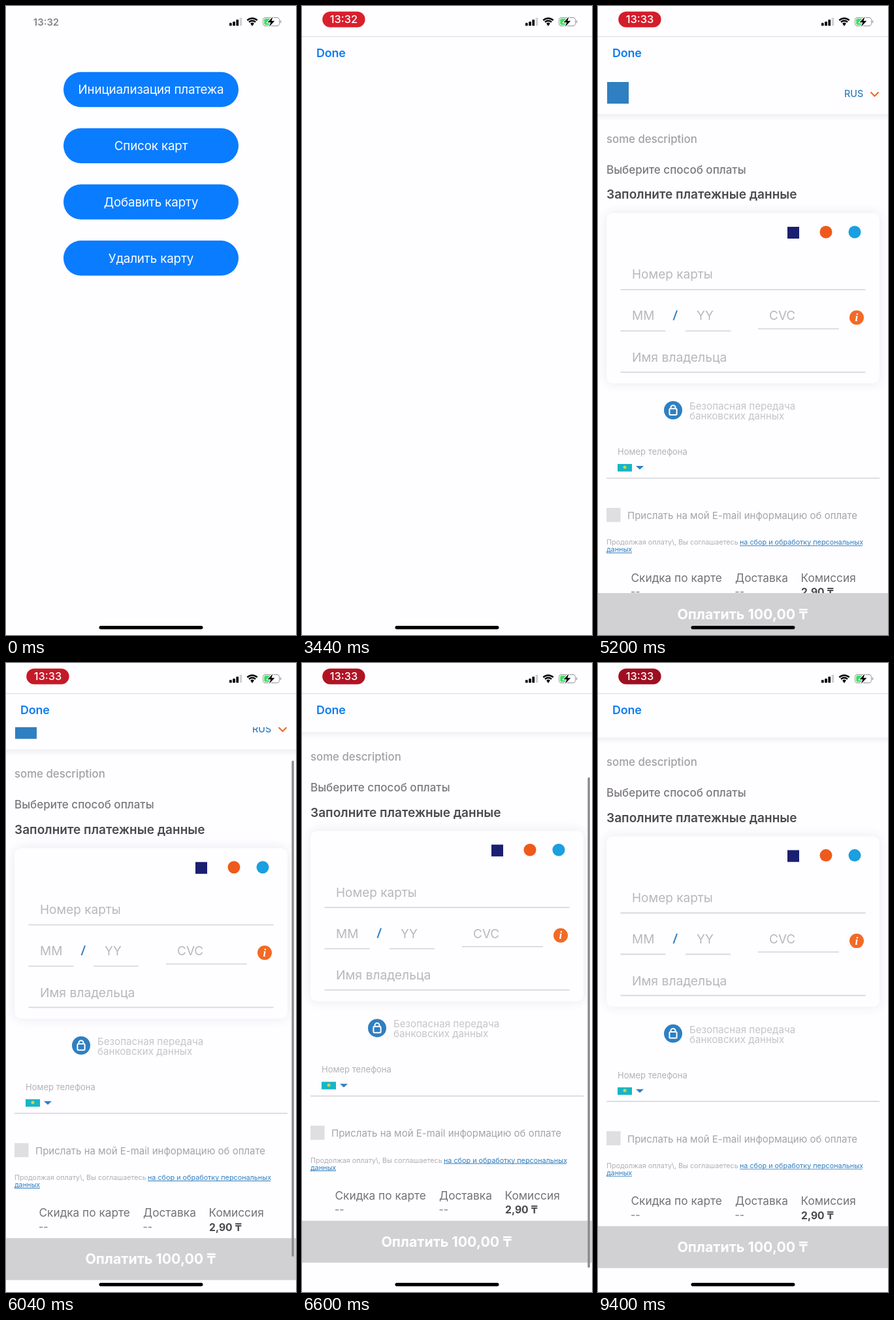
These frames come from a looping animation (444 px wide and 960 px high, 9.48 s). An HTML page with a canvas:

```html
<!DOCTYPE html>
<html lang="ru">
<head>
<meta charset="utf-8">
<title>Оплата</title>
<style>
  html, body { margin: 0; width: 100%; height: 100%; overflow: hidden; background: #fefdff; }
  canvas { display: block; width: 444px; height: 960px; }
</style>
</head>
<body>
<canvas id="stage"></canvas>
<script>
const W = 444, H = 960, LOOP = 9480;
const BG = '#fefdff', BLUE = '#0a7cff', LINK = '#2f7fc1', ORANGE = '#f26a26';
const BAR_BOTTOM = 98, REST_SCROLL = 51.4, PEAK_SCROLL = 91;
const canvas = document.getElementById('stage');
const ctx = canvas.getContext('2d');
const ratio = window.devicePixelRatio || 1;
canvas.width = W * ratio;
canvas.height = H * ratio;

const clamp = v => Math.max(0, Math.min(1, v));
const progress = (t, from, to) => clamp((t - from) / (to - from));
const easeOut = (p, power) => 1 - Math.pow(1 - p, power);

// y is the middle of the capital letters
function text(str, x, y, size, color, { weight = 400, align = 'left', spacing = 0 } = {}) {
  ctx.font = `${weight} ${size}px Inter, sans-serif`;
  ctx.letterSpacing = spacing + 'px';
  ctx.textAlign = align;
  ctx.fillStyle = color;
  ctx.fillText(str, x, y + size * 0.36);
}

function rect(x, y, w, h, color, radius = 0) {
  ctx.fillStyle = color;
  ctx.beginPath();
  ctx.roundRect(x, y, w, h, radius);
  ctx.fill();
}

function disc(x, y, r, color) {
  ctx.fillStyle = color;
  ctx.beginPath();
  ctx.arc(x, y, r, 0, 2 * Math.PI);
  ctx.fill();
}

function path(points, color, width, close) {
  ctx.beginPath();
  points.forEach(([x, y]) => ctx.lineTo(x, y));
  if (close) ctx.closePath();
  if (width) {
    ctx.strokeStyle = color;
    ctx.lineWidth = width;
    ctx.stroke();
  } else {
    ctx.fillStyle = color;
    ctx.fill();
  }
}

function faded(alpha, draw) {
  if (alpha <= 0) return;
  ctx.save();
  ctx.globalAlpha *= alpha;
  draw();
  ctx.restore();
}

function drawMenu(shift) {
  const labels = ['Инициализация платежа', 'Список карт', 'Добавить карту', 'Удалить карту'];
  labels.forEach((label, i) => {
    const y = 100.7 + i * 85.8;
    rect(88 + shift, y, 268, 53.5, BLUE, 26.7);
    text(label, 222 + shift, y + 27, 18.8, '#fff', { align: 'center', spacing: -0.15 });
  });
}

function drawSignal() {
  [4.5, 6.5, 9.5, 12.5].forEach((h, i) =>
    rect(342 + i * 5.2, 30.3 - h, 3.7, h, i < 3 ? '#000' : '#d3d2d5', 1));
}

function drawWifi() {
  ctx.strokeStyle = '#000';
  ctx.lineWidth = 2.5;
  for (const r of [7, 10.8]) {
    ctx.beginPath();
    ctx.arc(377, 29.6, r, -Math.PI * 0.75, -Math.PI * 0.25);
    ctx.stroke();
  }
  ctx.fillStyle = '#000';
  ctx.beginPath();
  ctx.moveTo(377, 30.8);
  ctx.arc(377, 29.6, 4, -Math.PI * 0.75, -Math.PI * 0.25);
  ctx.fill();
}

function drawBattery() {
  ctx.strokeStyle = '#a5a4a8';
  ctx.lineWidth = 1.1;
  ctx.beginPath();
  ctx.roundRect(393.5, 17.6, 25, 12.8, 3.8);
  ctx.stroke();
  rect(419.7, 21.8, 1.6, 4.4, '#a5a4a8', 1);
  rect(395.2, 19.3, 13, 9.4, '#3ddc65', 2.2);
  const bolt = [[408.5, 16.5], [400.6, 25.1], [405.3, 25.1], [403, 31.6], [411.3, 22.7], [406.5, 22.7]];
  path(bolt, BG, 2.2, true);
  path(bolt, '#000', 0, true);
}

function drawPill(t) {
  const wave = (1 - Math.cos(2 * Math.PI * (t - 6280) / 900)) / 2;
  const dark = Math.pow(wave, 1.5);
  const mix = (a, b) => Math.round(a + (b - a) * dark);
  const red = `rgb(${mix(224, 158)},${mix(33, 14)},${mix(46, 32)})`;
  const shown = progress(t, 40, 400);
  const clock = t < 4500 ? '13:32' : '13:33';
  const toClock = progress(t, 2200, 2450);

  faded(1 - shown, () => text('13:32', 61.5, 24.5, 14.9, '#868489', { weight: 600, align: 'center' }));
  faded(shown, () => {
    rect(31.2, 8.4, 65.4, 24, red, 12);
    faded(1 - toClock, () => {
      ctx.strokeStyle = '#fff';
      ctx.lineWidth = 1.7;
      ctx.beginPath();
      ctx.arc(64, 20.5, 7.6, 0, 2 * Math.PI);
      ctx.stroke();
      disc(64, 20.5, 3.9, '#fff');
    });
    faded(toClock, () => text(clock, 64, 20.5, 16.4, '#fff', { weight: 500, align: 'center' }));
  });
}

function drawHeader() {
  const shade = ctx.createLinearGradient(0, 165, 0, 175);
  shade.addColorStop(0, 'rgba(60,50,70,0.07)');
  shade.addColorStop(1, 'rgba(60,50,70,0)');
  ctx.fillStyle = shade;
  ctx.fillRect(0, 165, W, 10);
  rect(0, 40, W, 125, BG);
  rect(14, 116, 33, 33, LINK);
  text('RUS', 377, 134, 14.4, LINK, { weight: 500 });
  path([[417.5, 131.5], [423.5, 137.5], [429.5, 131.5]], ORANGE, 2.2);
}

function drawCard() {
  ctx.save();
  ctx.shadowColor = 'rgba(60,50,80,0.1)';
  ctx.shadowBlur = 18 * ratio;
  rect(13, 316, 418, 260, BG, 10);
  ctx.restore();

  rect(290, 337, 18, 18, '#1a1f71');
  disc(349, 345, 9.5, '#ee5a1c');
  disc(393, 345, 9.5, '#1a9fe0');

  const hint = '#b9b7bb', rule = '#d9d8dc';
  text('Номер карты', 52, 409.5, 19, hint);
  text('MM', 52, 472.5, 19, hint);
  path([[115.5, 479.5], [121, 464.5]], LINK, 2);
  text('YY', 151, 472.5, 19, hint);
  text('CVC', 262, 472.5, 19, hint);
  text('Имя владельца', 52, 536, 19.3, hint);
  const rules = [[34.5, 432, 375], [34.5, 495, 69], [134, 495, 69], [245, 491.7, 124], [34.5, 558, 375]];
  rules.forEach(([x, y, w]) => rect(x, y, w, 1.8, rule));

  disc(396, 475.5, 11, ORANGE);
  ctx.font = 'italic 700 17px "Liberation Serif", serif';
  ctx.letterSpacing = '0px';
  ctx.textAlign = 'center';
  ctx.fillStyle = '#fff';
  ctx.fillText('i', 395.8, 481);
}

function drawSecurity() {
  disc(115, 617, 14, LINK);
  ctx.strokeStyle = '#fff';
  ctx.lineWidth = 2;
  ctx.beginPath();
  ctx.roundRect(109.4, 614.5, 11.2, 9.5, 1.5);
  ctx.moveTo(111.4, 614.5);
  ctx.lineTo(111.4, 613);
  ctx.arc(115, 613, 3.6, Math.PI, 0);
  ctx.lineTo(118.6, 614.5);
  ctx.stroke();
  text('Безопасная передача', 140, 610.5, 15.15, '#c6c4c8');
  text('банковских данных', 140, 625.5, 15.15, '#c6c4c8');
}

function drawPhone() {
  text('Номер телефона', 30, 680.5, 13, '#b3b1b5');
  rect(30, 699, 22, 11.5, '#16b5c6');
  disc(41, 704, 2.5, '#d9cf45');
  path([[58, 702], [70, 702], [64, 707.5]], LINK, 0, true);
  rect(13, 719.7, 418, 1.8, '#d9d8dc');
}

function drawConsent() {
  rect(13, 766, 21.5, 21.5, '#dfdee1');
  text('Прислать на мой E-mail информацию об оплате', 45, 777.5, 15, '#a5a3a7');
  text('Продолжая оплату\\, Вы соглашаетесь', 13, 818.5, 10.75, '#b0aeb2');
  text('на сбор и обработку персональных', 217, 818.5, 10.8, LINK);
  text('данных', 13, 829.5, 10.8, LINK);
  rect(217, 823.3, 188, 0.9, LINK);
  rect(13, 834.3, 39, 0.9, LINK);
}

function drawTotals() {
  const labels = [['Скидка по карте', 50.5], ['Доставка', 210], ['Комиссия', 310.5]];
  labels.forEach(([label, x]) => text(label, x, 872.5, 17.25, '#737175'));
  for (const x of [51, 210.5]) {
    rect(x, 893.7, 5.2, 1.6, '#949296');
    rect(x + 7.3, 893.7, 5.2, 1.6, '#949296');
  }
  text('2,90 ₸', 311, 894.5, 15.7, '#4a484c', { weight: 700 });
}

function drawPage(scroll) {
  ctx.save();
  ctx.beginPath();
  ctx.rect(0, BAR_BOTTOM, W, H - BAR_BOTTOM);
  ctx.clip();
  ctx.save();
  ctx.translate(0, -scroll);
  drawHeader();
  text('some description', 13, 202.5, 16.8, '#a2a0a4', { weight: 500 });
  text('Выберите способ оплаты', 13, 249.5, 17, '#7a787c', { weight: 500 });
  text('Заполните платежные данные', 13, 287.5, 19.1, '#4c4a4e', { weight: 600 });
  drawCard();
  drawSecurity();
  drawPhone();
  drawConsent();
  drawTotals();
  ctx.restore();

  // The pay button sticks to the bottom edge until the page end pulls it up
  const top = Math.min(896, 911 - scroll);
  rect(0, top, W, 64, '#d1d0d2');
  text('Оплатить 100,00 ₸', 221.5, top + 32, 21.4, '#fff', { weight: 700, align: 'center' });
  ctx.restore();
}

function drawScrollbar(scroll) {
  const over = Math.max(0, scroll - REST_SCROLL);
  const top = 118 + 48 * Math.min(1, scroll / REST_SCROLL) + over;
  const bottom = Math.min(923, top + 757);
  rect(437.4, top, 3.4, bottom - top, '#8b898d', 1.7);
}

function scrollAt(t) {
  if (t < 6280) return PEAK_SCROLL * easeOut(progress(t, 5980, 6280), 2);
  const k = (t - 6280) / 110;
  return REST_SCROLL + (PEAK_SCROLL - REST_SCROLL) * (1 + k) * Math.exp(-k);
}

function draw(t) {
  ctx.setTransform(ratio, 0, 0, ratio, 0, 0);
  rect(0, 0, W, H, BG);

  const slide = easeOut(progress(t, 2200, 2640), 3);
  if (slide < 1) {
    drawMenu(-0.3 * W * slide);
    rect(W * (1 - slide), 0, W, H, BG);
  }
  if (t >= 4500) {
    const scroll = scrollAt(t);
    drawPage(scroll);
    faded(progress(t, 5980, 6040) * (1 - progress(t, 7900, 8200)), () => drawScrollbar(scroll));
  }
  faded(progress(t, 2640, 2840), () => {
    rect(0, 46, W, 1.2, '#dedde1');
    text('Done', 22, 71.5, 17.9, '#0b7df0', { weight: 600, spacing: -0.2 });
  });

  drawPill(t);
  drawSignal();
  drawWifi();
  drawBattery();
  rect(142.5, 946, 159, 5.2, '#000', 2.6);
}

const start = performance.now();
function tick() {
  draw((performance.now() - start) % LOOP);
  requestAnimationFrame(tick);
}
tick();
</script>
</body>
</html>
```
